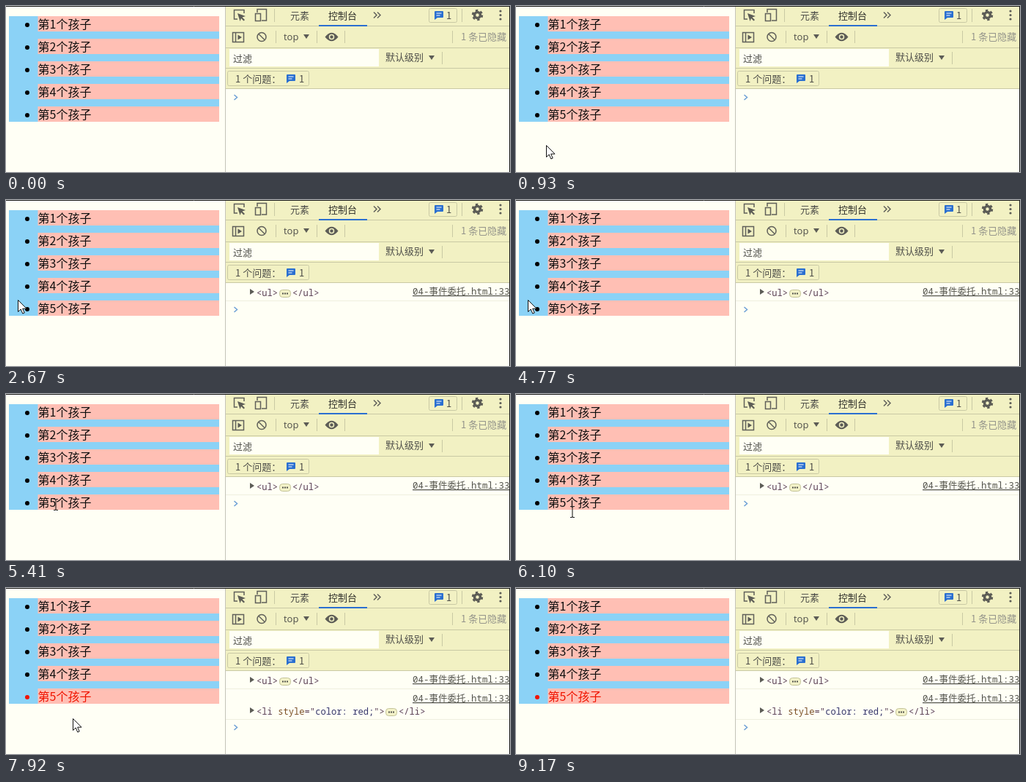
Write an HTML page that moves like this. It is 688 px wide and 228 px high and loops after 9.59 s.

```html
<!DOCTYPE html>
<html lang="zh-CN">
<head>
<meta charset="utf-8">
<title>事件委托</title>
<style>
html, body { margin: 0; width: 100%; height: 100%; overflow: hidden; background: #fffff5; }
svg { display: block; width: 688px; height: 228px; }
text { font: 13px "Noto Sans CJK SC", "Noto Sans CJK", sans-serif; fill: #4c4c48; white-space: pre; }
.item { font-size: 16px; fill: #101010; }
.bullet { fill: #000; }
.red .item, .red .bullet { fill: #f01400; }
.latin { font-family: "Open Sans", sans-serif; }
.code { font: 12.15px "Noto Sans Mono", "Noto Sans CJK SC", monospace; fill: #5a3f55; }
.link { font: 12.5px "Noto Sans Mono", "Noto Sans CJK SC", monospace; fill: #55554f; text-decoration: underline; }
.attr { fill: #7c5026; }
.value { fill: #36366c; }
.icon { fill: none; stroke: #60605a; stroke-width: 1.5; }
.solid { fill: #5c5c56; }
.rule { stroke: #c9c9a4; fill: none; }
.soft { stroke: #efefdf; }
.blue { fill: #2a6fd0; }
.prompt { fill: none; stroke: #6b9ed6; stroke-width: 1.5; }
</style>
</head>
<body>
<svg viewBox="0 0 688 228">
  <defs>
    <g id="chat">
      <path class="blue" d="M1 0H11Q12 0 12 1V8Q12 9 11 9H4L0 12V1Q0 0 1 0Z"/>
      <path d="M2.5 3H9.5M2.5 6H7.5" stroke="#fff"/>
    </g>
    <path id="tri" class="solid" d="M0 0H8L4 6Z"/>
    <path id="fold" class="solid" d="M0 0L6 4L0 8Z"/>
    <g id="dots">
      <rect x=".5" y=".5" width="15" height="10" rx="4" fill="#f3f2c8" stroke="#c4c49a"/>
      <path d="M4 5.5h2M7 5.5h2M10 5.5h2" stroke="#55554f" stroke-width="2"/>
    </g>
  </defs>

  <rect width="688" height="228" fill="#fffff5"/>
  <rect x="4" y="14" width="287" height="145" fill="#8bd2f6"/>
  <g id="list"></g>

  <rect x="300" y="0" width="388" height="114" fill="#f2f1c3"/>
  <path class="rule" d="M300 27.5H688M300 57.5H688M300 85.5H688M300 113.5H688"/>
  <path d="M299.5 0V228" stroke="#c4c4b8"/>

  <!-- tabs -->
  <path class="icon" d="M316 18H311.5V5.5H325V10"/>
  <path class="solid" d="M316 10L327 14L322.5 15.5L326 19L324.5 20.5L321 17L319.5 21Z"/>
  <path class="icon" d="M343 9V4.5H355.5V20H349M340.5 10.5H347.5V20.5H340.5Z"/>
  <path class="rule" d="M366.5 4V22"/>
  <text x="388" y="18">元素</text>
  <text x="440" y="18" style="fill:#2e2e2a">控制台</text>
  <rect x="427" y="26" width="66" height="2" fill="#2a6fd0"/>
  <path class="icon" d="M502 8.5L506 12.5L502 16.5M507 8.5L511 12.5L507 16.5"/>
  <rect class="rule" x="577.5" y="3.5" width="38" height="19" rx="2"/>
  <use href="#chat" x="585" y="7"/>
  <text x="601" y="18">1</text>
  <path class="rule" d="M622.5 4V22"/>
  <circle cx="643.5" cy="12.5" r="6.2" fill="none" stroke="#5c5c56" stroke-width="3" stroke-dasharray="3.25 3.24"/>
  <circle cx="643.5" cy="12.5" r="4" fill="none" stroke="#5c5c56" stroke-width="3.5"/>
  <g class="solid"><circle cx="675" cy="7" r="1.6"/><circle cx="675" cy="12.5" r="1.6"/><circle cx="675" cy="18" r="1.6"/></g>

  <!-- console tools -->
  <path class="icon" d="M309.5 36.5H324.5V49.5H309.5ZM313.5 36V50"/>
  <path class="solid" d="M316.5 39.5L322 43L316.5 46.5Z"/>
  <circle class="icon" cx="349" cy="42.5" r="6"/>
  <path class="icon" d="M345 38.5L353 46.5"/>
  <path class="rule" d="M368.5 34V51M424.5 34V51M462.5 34V51M609.5 34V51M595.5 63V80"/>
  <text class="latin" x="379" y="47">top</text>
  <use href="#tri" x="406" y="39"/>
  <path class="solid" d="M435.5 42.5Q444.5 31 453.5 42.5Q444.5 54 435.5 42.5Z"/>
  <circle cx="444.5" cy="42.5" r="3" fill="#5c5c56" stroke="#f2f1c3" stroke-width="1.5"/>
  <text x="621" y="47" style="fill:#93938a">1 条已隐藏</text>

  <rect x="305" y="59" width="204" height="24" fill="#fffff5"/>
  <text x="310" y="77">过滤</text>
  <text x="518" y="75">默认级别</text>
  <use href="#tri" x="577" y="68"/>

  <rect class="rule" x="302.5" y="89.5" width="111" height="20" rx="2"/>
  <text x="313" y="105">1 个问题：</text>
  <use href="#chat" x="383" y="94"/>
  <text x="400" y="105">1</text>

  <!-- messages -->
  <g id="first">
    <use href="#fold" x="333" y="122"/>
    <text class="code" x="342" y="132">&lt;ul&gt;</text>
    <use href="#dots" x="373" y="123"/>
    <text class="code" x="391" y="132">&lt;/ul&gt;</text>
    <text class="link" x="555" y="130">04-事件委托.html:33</text>
    <path class="soft" d="M300 138.5H688"/>
  </g>
  <g id="second">
    <text class="link" x="555" y="156">04-事件委托.html:33</text>
    <use href="#fold" x="333" y="164"/>
    <text class="code" x="342" y="174">&lt;li <tspan class="attr">style</tspan>="<tspan class="value">color: red;</tspan>"&gt;</text>
    <use href="#dots" x="518" y="165"/>
    <text class="code" x="536" y="174">&lt;/li&gt;</text>
    <path class="soft" d="M300 180.5H688"/>
  </g>
  <path id="prompt" class="prompt" d="M311.5 -3.5L315.5 0L311.5 3.5"/>

  <path d="M0 .5H688M687.5 0V228" stroke="#1c1c1c"/>

  <path id="arrow" d="M.5 .5V16.5L4.2 13L6.8 19L9.2 18L6.7 12.2H12Z" fill="#fff" stroke="#111"/>
  <path id="beam" d="M-3 -7.5H-1L0 -6.5L1 -7.5H3M0 -6.5V6.5M-3 7.5H-1L0 6.5L1 7.5H3" fill="none" stroke="#222" stroke-width="1.1"/>
</svg>
<script>
const LOOP = 9590;
const FIRST_CLICK = 2550, SECOND_CLICK = 6510;
const $ = id => document.getElementById(id);

$('list').innerHTML = [1, 2, 3, 4, 5].map(n => {
  const y = 14 + (n - 1) * 31;
  return `<g id="item${n}"><rect x="43.5" y="${y}" width="247.5" height="21" fill="#ffbfb4"/>
    <circle class="bullet" cx="29" cy="${y + 12}" r="3"/>
    <text class="item" x="43.5" y="${y + 17}">第${n}个孩子</text></g>`;
}).join('');

// pointer stops: time, x, y
const path = [
  [650, 66, 230], [900, 44, 196], [1130, 25, 160], [1370, 18, 143],
  [1580, 17, 140], [1620, 17, 140], [1660, 16, 137],
  [4770, 16, 137], [5000, 34, 141], [5220, 58, 147], [5410, 68, 152],
  [5660, 71, 160], [5740, 71, 160], [5820, 72, 162],
  [6060, 72, 162], [6100, 77, 162],
  [7720, 77, 162], [7900, 88, 176], [8060, 112, 202], [8200, 140, 232]
];

function pointer(t) {
  const i = path.findIndex(p => p[0] > t);
  if (i < 1) return null;
  const [t0, x0, y0] = path[i - 1], [t1, x1, y1] = path[i];
  const k = (t - t0) / (t1 - t0);
  return [Math.round(x0 + (x1 - x0) * k), Math.round(y0 + (y1 - y0) * k)];
}

const show = (el, on) => { el.style.display = on ? '' : 'none'; };

function draw(t) {
  const one = t >= FIRST_CLICK, two = t >= SECOND_CLICK;
  show($('first'), one);
  show($('second'), two);
  $('item5').setAttribute('class', two ? 'red' : '');
  $('prompt').setAttribute('transform', `translate(0 ${two ? 191.5 : one ? 150.5 : 125.5})`);

  const at = pointer(t);
  const overText = at && at[0] >= 44 && at[0] <= 117 && at[1] >= 138 && at[1] <= 163;
  show($('arrow'), at && !overText);
  show($('beam'), overText);
  if (at) for (const id of ['arrow', 'beam'])
    $(id).setAttribute('transform', `translate(${at[0]} ${at[1]})`);
}

const start = performance.now();
function tick() {
  draw((performance.now() - start) % LOOP);
  requestAnimationFrame(tick);
}
tick();
</script>
</body>
</html>
```
